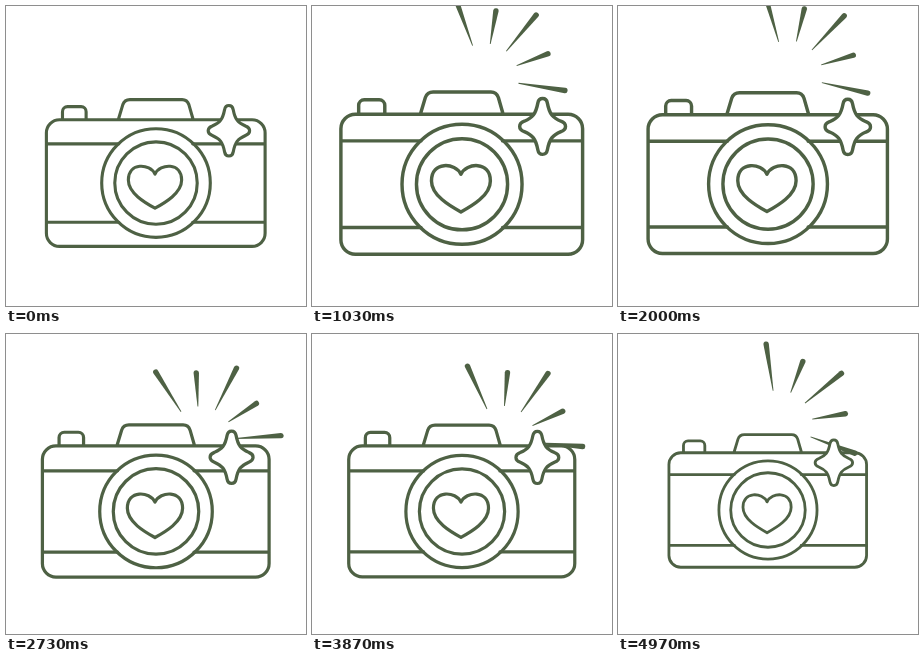
Animation, 300 px wide and 300 px high, one loop 5.01 s. Source, as an HTML page with a canvas:

```html
<!DOCTYPE html>
<html lang="en">
<head>
<meta charset="utf-8">
<title>Camera flash</title>
<style>
  html, body { margin: 0; width: 100%; height: 100%; overflow: hidden; background: #fff; }
  canvas { display: block; width: 300px; height: 300px; }
</style>
</head>
<body>
<canvas id="stage"></canvas>
<script>
const LOOP = 5010, STEP = 100 / 3, LAST = 149;
const INK = '#4e6144', PAPER = '#fff', TURN = Math.PI * 2;
const canvas = document.getElementById('stage');
const ratio = window.devicePixelRatio || 1;
canvas.width = canvas.height = 300 * ratio;
const ctx = canvas.getContext('2d');

// Camera outlines at scale 1
const body = new Path2D(
  'M54 114H245.5A13 13 0 0 1 258.5 127V227A13 13 0 0 1 245.5 240H54A13 13 0 0 1 41 227V127A13 13 0 0 1 54 114Z' +
  'M57 114V106A5 5 0 0 1 62 101H75.5A5 5 0 0 1 80.5 106V114' +
  'M112.5 114L117 99Q118.7 94 124 94H176Q181 94 182.7 99L187 114' +
  'M41 138H113M186.5 138H258.5M41 216H113M186.5 216H258.5');
const heart = new Path2D(
  'M149 168C144 157.5 122.5 156 122.5 174C122.5 187 139 196.5 149 202' +
  'C159 196.5 175.5 187 175.5 174C175.5 156 154 157.5 149 168Z');
const star = new Path2D(
  'M-4.3 -21C-3.3 -26.5 3.3 -26.5 4.3 -21C6.2 -11 9 -8 16.5 -4.7C22 -2.6 22 2.6 16.5 4.7' +
  'C9 8 6.2 11 4.3 21C3.3 26.5 -3.3 26.5 -4.3 21C-6.2 11 -9 8 -16.5 4.7' +
  'C-22 2.6 -22 -2.6 -16.5 -4.7C-9 -8 -6.2 -11 -4.3 -21Z');

// Key poses of the ray fan: time, hub x, hub y, degrees
const poses = [
  [633, 173.4, 93.3, 0], [1433, 169.6, 81, 3], [2000, 170.2, 82.7, 4.5],
  [2733, 193.6, 88.9, -12], [3867, 189.3, 88.8, -4], [4967, 160.2, 76.6, 12]
];

// Pose by index, wrapping around the loop
function poseAt(i) {
  const n = poses.length;
  const [time, ...rest] = poses[(i + n) % n];
  return [time + Math.floor(i / n) * LOOP, ...rest];
}

// Smooth periodic curve through the key poses
function fanPose(t) {
  let i = -1;
  while (t >= poseAt(i + 1)[0]) i++;
  const [p, a, b, q] = [i - 1, i, i + 1, i + 2].map(poseAt);
  const span = b[0] - a[0], u = (t - a[0]) / span, v = 1 - u;
  const [x, y, deg] = [1, 2, 3].map(k => {
    const from = (b[k] - p[k]) / (b[0] - p[0]) * span;
    const to = (q[k] - a[k]) / (q[0] - a[0]) * span;
    return a[k] * (1 + 2 * u) * v * v + b[k] * u * u * (3 - 2 * u) +
      from * u * v * v - to * u * u * v;
  });
  const bob = -18 * Math.cos(TURN * (t - 950) / 1183);
  return { x, y: y + bob, angle: deg / 360 * TURN };
}

// The camera breathes between 187.5 and 250 px wide
function cameraScale(t) {
  const turn = (t - 169) / 894;
  const u = Math.abs(turn - Math.round(turn)) * 2;
  return (250 - 62.5 * (u + 0.35 * u * (1 - u))) / 220;
}

function enterCamera(s) {
  ctx.save();
  ctx.translate(149.75, 166);
  ctx.scale(s, s);
  ctx.translate(-149.75, -166);
  ctx.lineWidth = 3.1;
  ctx.lineJoin = ctx.lineCap = 'round';
  ctx.strokeStyle = INK;
}

function ring(r) {
  ctx.beginPath();
  ctx.arc(150, 177, r, 0, TURN);
  ctx.stroke();
}

function drawCamera(s) {
  enterCamera(s);
  ctx.stroke(body);
  ring(54);
  ring(41);
  ctx.stroke(heart);
  ctx.restore();
}

function drawStar(s) {
  enterCamera(s);
  ctx.translate(222.5, 125);
  ctx.fillStyle = PAPER;
  ctx.fill(star);
  ctx.stroke(star);
  ctx.restore();
}

// Five tapered rays around one hub, long and short in turn
function drawRays(t) {
  const { x, y, angle } = fanPose(t);
  const root = 34.5, thin = 0.4, thick = 2.7;
  ctx.fillStyle = INK;
  for (let i = 0; i < 5; i++) {
    const tip = i % 2 ? 68 : 81.5;
    ctx.save();
    ctx.translate(x, y);
    ctx.rotate(angle + (29.7 * i - 110.5) / 360 * TURN);
    ctx.beginPath();
    ctx.moveTo(root, thin);
    ctx.lineTo(root, -thin);
    ctx.arc(tip, 0, thick, -TURN / 4, TURN / 4);
    ctx.fill();
    ctx.restore();
  }
}

function draw(t) {
  ctx.setTransform(ratio, 0, 0, ratio, 0, 0);
  ctx.fillStyle = PAPER;
  ctx.fillRect(0, 0, 300, 300);
  const s = cameraScale(t);
  drawCamera(s);
  if (t > 0) drawRays(t);
  drawStar(s);
}

const start = performance.now();
function tick() {
  const t = (performance.now() - start) % LOOP;
  draw(Math.min(LAST, Math.floor((t + 5) / STEP)) * STEP);
  requestAnimationFrame(tick);
}
tick();
</script>
</body>
</html>
```
